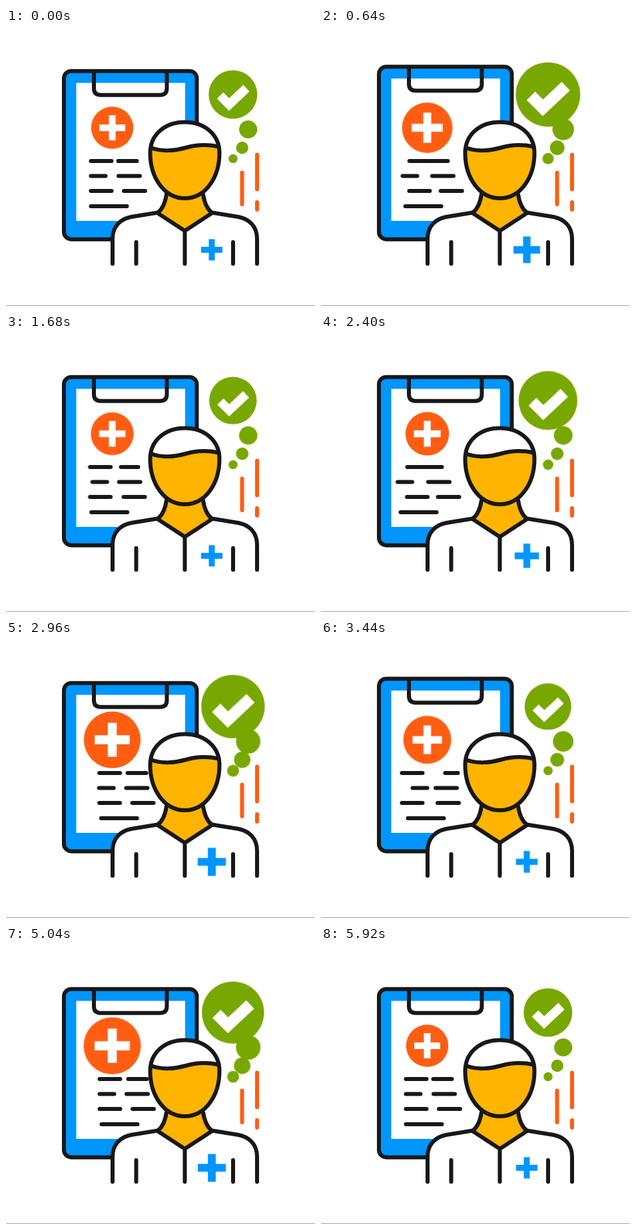
Animation, 464 px wide and 418 px high, one loop 6 s. Source, as an HTML page without scripts:

```html
<!DOCTYPE html>
<html lang="en">
<head>
<meta charset="utf-8">
<title>Medical report</title>
<style>
  @property --up { syntax: "<length>"; inherits: true; initial-value: 0px; }

  html, body { margin: 0; width: 100%; height: 100%; overflow: hidden; background: #fff; }
  svg { display: block; width: 464px; height: 418px; }

  .ink { fill: none; stroke: #18181a; stroke-width: 6; stroke-linecap: round; stroke-linejoin: round; }
  .blue { fill: #0096ff; }
  .green { fill: #78a800; }
  .red { fill: #ff5d12; }
  .skin { fill: #ffb400; }
  .white { fill: #fff; }
  .dash { stroke: #ff5d12; stroke-width: 6; stroke-linecap: round; }

  /* The board grows upwards, its foot stays put */
  .board { animation: rise 6s cubic-bezier(.37, 0, .63, 1) infinite; }
  .back { y: calc(64.7px - var(--up)); height: calc(253px + var(--up)); }
  .sheet { y: calc(82.5px - var(--up)); height: calc(207.5px + var(--up)); }
  .clip { transform: translateY(calc(-1 * var(--up))); }
  @keyframes rise {
    0%, 7.73%, 26.4%, 54.4%, 73.07%, 100% { --up: 0px; }
    17.07%, 63.73% { --up: 29px; }
  }

  .pulse { transform-box: fill-box; transform-origin: center; animation: 2s linear infinite; }
  .early { animation-name: early; }
  .late { animation-name: late; }
  .mild { animation-name: mild; }
  @keyframes early {
    0%, 90%, 100% { transform: scale(1); }
    12% { transform: scale(1.11); }
    20% { transform: scale(1.21); }
    24% { transform: scale(1.27); }
    30% { transform: scale(1.32); }
    38% { transform: scale(1.345); }
    46% { transform: scale(1.32); }
    52% { transform: scale(1.28); }
    56% { transform: scale(1.26); }
    60% { transform: scale(1.18); }
    64% { transform: scale(1.1); }
    72% { transform: scale(.96); }
    78% { transform: scale(.955); }
  }
  @keyframes late {
    0%, 90%, 100% { transform: scale(1); }
    12% { transform: scale(.96); }
    20% { transform: scale(1.03); }
    36% { transform: scale(1.25); }
    46% { transform: scale(1.34); }
    54% { transform: scale(1.36); }
    58% { transform: scale(1.345); }
    64% { transform: scale(1.27); }
    72% { transform: scale(1.135); }
    82% { transform: scale(1.02); }
  }
  @keyframes mild {
    0%, 85%, 100% { transform: scale(1); }
    12% { transform: scale(1.07); }
    20% { transform: scale(1.14); }
    36% { transform: scale(1.28); }
    46% { transform: scale(1.33); }
    56% { transform: scale(1.3); }
    72% { transform: scale(1.02); }
  }

  /* Text bars slide through four offsets: a, b, c, d */
  .bars rect { fill: #18181a; height: 6px; rx: 3px; animation: slide 2s ease-in-out infinite; }
  @keyframes slide {
    0%, 90%, 100% { transform: none; }
    12%, 20% { transform: translateX(var(--a)); }
    52% { transform: translateX(var(--b)); }
    56% { transform: translateX(var(--c)); }
    72% { transform: translateX(var(--d)); }
  }
  .bars .short { animation-name: slide, shrink; }
  @keyframes shrink {
    0%, 56%, 90%, 100% { width: 34px; }
    72% { width: 25px; }
  }
</style>
</head>
<body>
<svg viewBox="0 0 464 418">
  <g class="board">
    <rect class="back blue" x="87" width="199.500" rx="11"/>
    <rect class="sheet white" x="105.500" width="163.500"/>
    <rect class="back ink" x="87" width="199.500" rx="11"/>
    <path class="clip ink" d="M132 66V90.500Q132 100.700 142 100.700H231.500Q241.500 100.700 241.500 90.500V66"/>
  </g>

  <g class="pulse late">
    <circle class="red" cx="159.500" cy="150" r="31.700"/>
    <path class="white" d="M154.500 131h10v14h14.500v10h-14.500v14h-10v-14h-14.500v-10h14.500z"/>
  </g>

  <g class="bars">
    <rect x="124.500" y="197" width="37" style="--a:2px;--b:13px;--c:14.500px;--d:-6px"/>
    <rect class="short" x="165.500" y="197" width="34" style="--a:-15px;--b:15px;--c:18px;--d:18px"/>
    <rect x="124.500" y="219.500" width="28" style="--a:-12.500px;--b:13px;--c:14px;--d:10px"/>
    <rect x="166" y="219.500" width="38" style="--a:-8px;--b:12px;--c:14px;--d:3px"/>
    <rect x="124.500" y="242" width="37" style="--a:1.500px;--b:13px;--c:14.500px;--d:-6px"/>
    <rect x="174" y="242" width="38" style="--a:-1.500px;--b:13px;--c:17px;--d:-2px"/>
    <rect x="124.500" y="265" width="60" style="--a:-8px;--b:16px;--c:17px;--d:3px"/>
  </g>

  <path class="white" d="M160 358V317C160 298 172 287 188 284L228 278H309L349 284C365 287 377 298 377 317V358Z"/>
  <path class="skin" d="M241 250Q239 270 228 278L268.500 305L309 278Q298 270 296 250Z"/>
  <g class="ink">
    <path d="M160 354.500V317C160 298 172 287 188 284L228 277.500Q238 270 241 250"/>
    <path d="M377 354.500V317C377 298 365 287 349 284L309 277.500Q299 270 296 250"/>
    <path d="M228 278.500L268.500 305L309 278.500M268.500 305V354.500M195.500 322V354.500M341 322V354.500"/>
  </g>

  <path class="white" d="M268.500 141.500C298 141.500 320.500 160 320.500 188C320.500 224 300 256 268.500 256S216.500 224 216.500 188C216.500 160 239 141.500 268.500 141.500Z"/>
  <path class="skin" d="M217 180C233 186 253 185 270 180S303 175 320.500 178.500V188C320.500 224 300 256 268.500 256S216.500 224 216.500 188Z"/>
  <g class="ink">
    <path d="M268.500 141.500C298 141.500 320.500 160 320.500 188C320.500 224 300 256 268.500 256S216.500 224 216.500 188C216.500 160 239 141.500 268.500 141.500Z"/>
    <path d="M218 180C233 186 253 185 270 180S303 175 319.500 178.500"/>
  </g>

  <path class="blue pulse mild" d="M304.500 317.500h9v11.500h11.500v9h-11.500v11.500h-9v-11.500h-11.500v-9h11.500z"/>

  <g class="green">
    <circle class="pulse mild" cx="341" cy="196.500" r="6.800"/>
    <circle class="pulse late" cx="354.700" cy="180" r="9.200"/>
    <circle class="pulse late" cx="363.700" cy="152.500" r="13.600"/>
  </g>
  <g class="pulse early">
    <circle class="green" cx="340.800" cy="100" r="36.500"/>
    <path d="M321.500 101.500L335 115L361 90.500" fill="none" stroke="#fff" stroke-width="13.500"/>
  </g>

  <path class="dash" d="M377 190.500V242.500M354.500 217.500V265M377 262V273"/>
  <rect y="417" width="464" height="1" fill="#a6a6a6"/>
</svg>
</body>
</html>
```
